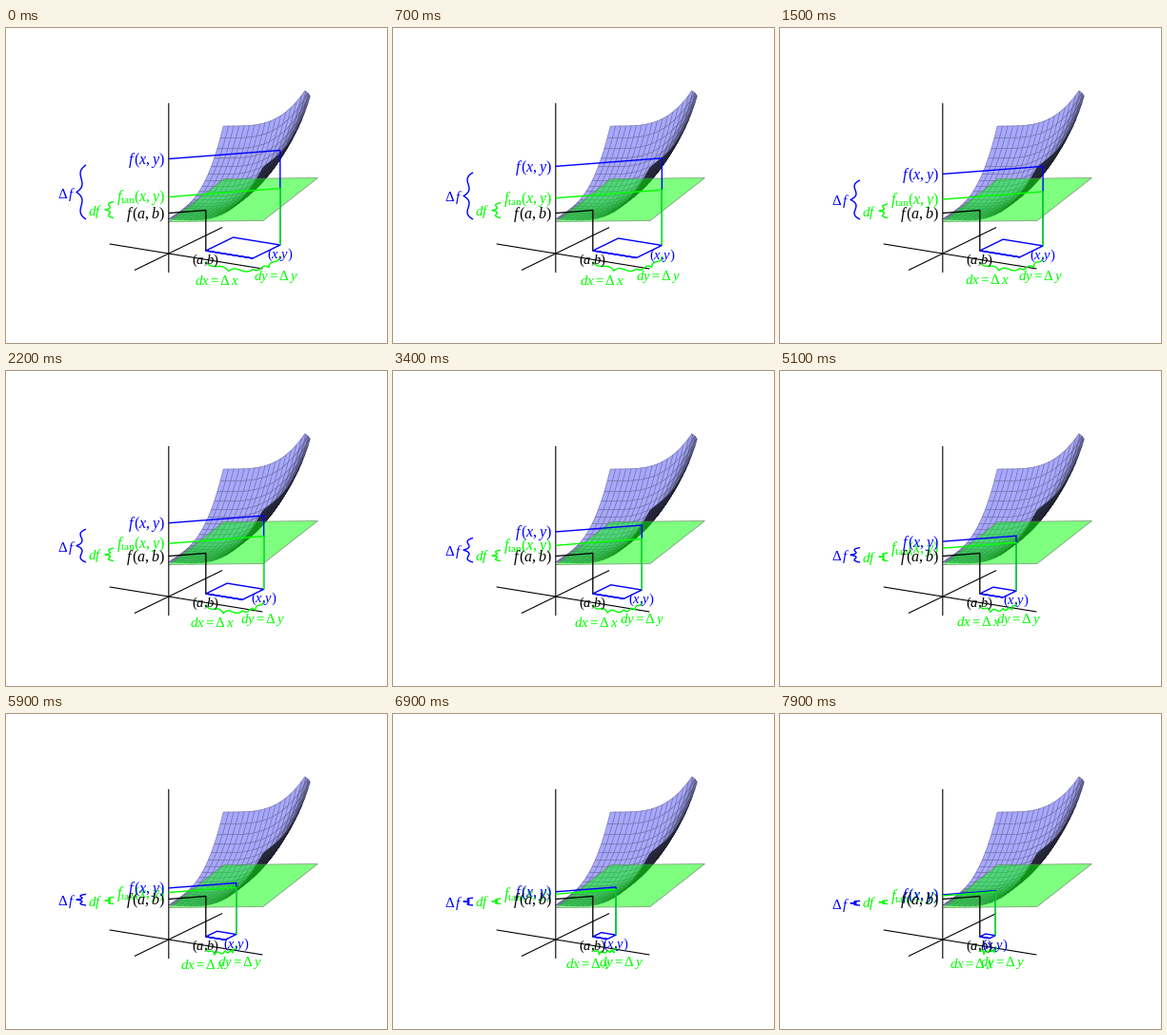
Write a matplotlib script that moves like this. It is 400 by 331 pixels and loops after 8 s.

```python
import numpy as np
import matplotlib.pyplot as plt
from matplotlib.animation import FuncAnimation
from matplotlib.collections import PolyCollection

plt.rcParams.update({
    "mathtext.fontset": "custom",
    "mathtext.rm": "Liberation Serif",
    "mathtext.it": "Liberation Serif:italic",
    "path.snap": False,
})

W, H, DPI = 400, 331, 64
PT = 72 / DPI
FRAMES, INTERVAL = 80, 100
BLUE, GREEN, BLACK = "#0000ff", "#00ff00", "#000000"

ORIGIN = np.array([170.8, 237.0])
UX, UY = np.array([49.3, 8.0]), np.array([28.7, -14.0])
A = 0.5        # both coordinates of the base point
TOP = 157      # clipping height of the surface
MIX = 1.5
CELLS = 18
VIEW = np.array([0.476, -0.832, 0.284])


def project(x, y, z=0.0):
    return ORIGIN + x * UX + y * UY - np.array([0, z])


def g(s):
    return 8.5 * s + (9.5 - MIX / 2) * s**2 + 10.5 * s**3


def slope(s):
    return 8.5 + (19 - MIX) * s + 31.5 * s**2


def height(x, y):
    p, q = x - A, y - A
    return 42.5 + g(p) + g(q) + MIX * p * q


def tangent(x, y):
    return 34 + 8.5 * (x + y)


def shade(x, y):
    p, q = x - A, y - A
    n = np.array([-slope(p) - MIX * q, -slope(q) - MIX * p, 54.4])
    k = np.clip(0.35 + 1.3 * (n @ VIEW) / np.linalg.norm(n), 0.28, 1)
    return k * np.array([0.66, 0.66, 1.0])


def clip_top(pts):
    out = []
    for p, q in zip(pts, pts[1:] + pts[:1]):
        if p[2] <= TOP:
            out.append(p)
        if (p[2] <= TOP) != (q[2] <= TOP):
            out.append(p + (q - p) * (TOP - p[2]) / (q[2] - p[2]))
    return out


def surface():
    faces = []
    d = 2 / CELLS
    for i in range(CELLS):
        for j in range(CELLS):
            corners = [(i, j), (i + 1, j), (i + 1, j + 1), (i, j + 1)]
            pts = clip_top([np.array([d * u, d * v, height(d * u, d * v)])
                            for u, v in corners])
            if len(pts) < 3:
                continue
            x, y = d * (i + 0.5), d * (j + 0.5)
            depth = VIEW @ np.array([x, y, height(x, y) / 54.4])
            faces.append((depth, [project(*p) for p in pts], shade(x, y)))
    faces.sort(key=lambda f: f[0])
    colors = np.array([f[2] for f in faces])
    return PolyCollection([f[1] for f in faces], facecolors=colors,
                          edgecolors=colors * 0.66, linewidths=0.6 * PT, zorder=1)


def brace(p, q, cusp):
    p, q, cusp = (np.asarray(v, float) for v in (p, q, cusp))
    t = np.linspace(0, 1, 25)
    bulge = 4.5 * t * (1 - t)**2 - 1.5 * t**2 * (1 - t) + t**3
    along = np.concatenate([t / 2, 1 - t[::-1] / 2])
    bulge = np.concatenate([bulge, bulge[::-1]])
    return p + np.outer(along, q - p) + np.outer(bulge, cusp)


fig = plt.figure(figsize=(W / DPI, H / DPI), dpi=DPI, facecolor="white")
ax = fig.add_axes([0, 0, 1, 1])
ax.set_xlim(0, W)
ax.set_ylim(H, 0)
ax.axis("off")


def line(color, width, pts=(), z=4):
    artist, = ax.plot([], [], color=color, lw=width * PT, zorder=z,
                      solid_capstyle="butt", solid_joinstyle="round")
    if len(pts):
        move(artist, pts)
    return artist


def move(artist, pts):
    artist.set_data(*np.asarray(pts, float).T)


def label(text, color, size, ha="left", pos=(0, 0)):
    return ax.text(*pos, text, color=color, fontsize=size * PT, ha=ha,
                   va="baseline", zorder=6)


# Fixed scene
ax.add_collection(surface())
plane = [project(x, y, tangent(x, y)) for x, y in [(0, 0), (2, 0), (2, 2), (0, 2)]]
ax.add_collection(PolyCollection([plane], facecolors=[(0, 1, 0, 0.5)],
                                 edgecolors=[(0.4, 0.5, 0.4, 0.75)],
                                 linewidths=0.8 * PT, zorder=2))
line(BLACK, 1.1, [project(-1.26, 0), project(2, 0)], 3)
line(BLACK, 1.1, [project(0, -1.25), project(0, 1.96)], 3)
line(BLACK, 1.1, [(ORIGIN[0], 79), (ORIGIN[0], 257)], 3)

base = project(A, A)
level = ORIGIN[1] - height(A, A)

# Moving parts
square = line(BLUE, 1.4)
f_line = line(BLUE, 1.4)
tan_line = line(GREEN, 1.4)
line(BLACK, 1.3, [(ORIGIN[0], level), project(A, A, height(A, A)), base], 5)

f_brace = line(BLUE, 1.4)
df_brace, dx_brace, dy_brace = (line(GREEN, 1.4) for _ in range(3))

tan_text = label(r"$f_{\mathrm{tan}}(x,y)$", GREEN, 16, "right")
f_text = label(r"$f\,(x,y)$", BLUE, 16, "right")
label(r"$f\,(a,b)$", BLACK, 16, "right", (167, level + 5))
big_text = label(r"$\Delta\,f$", BLUE, 15)
df_text = label(r"$df$", GREEN, 15)
dx_text = label(r"$dx=\Delta\,x$", GREEN, 15)
dy_text = label(r"$dy=\Delta\,y$", GREEN, 15)
label(r"$(a{,}b)$", BLACK, 14.5, "center", (base[0], base[1] + 14))
xy_text = label(r"$(x{,}y)$", BLUE, 14.5, "center")


def update(n):
    s = 1 - n / 100
    c = A + s
    foot, corner = project(c, c), project(c, A)
    f, ft = height(c, c), tangent(c, c)
    f_y, tan_y = ORIGIN[1] - f, ORIGIN[1] - ft

    move(square, [base, corner, foot, project(A, c), base, corner])
    move(f_line, [(ORIGIN[0], f_y), project(c, c, f), foot])
    move(tan_line, [(ORIGIN[0], tan_y), project(c, c, ft), foot])

    move(f_brace, brace((84, f_y + 6.5), (84, level + 6.5), (-10, 0)))
    move(df_brace, brace((113, tan_y + 5), (113, level + 5), (-9, 0)))
    drop = np.array([0, 11.5])
    move(dx_brace, brace(base + drop, corner + drop, (-1, 6)))
    move(dy_brace, brace(corner + drop, foot + drop, (2.5, 5)))

    f_text.set_position((167, f_y + 5.5))
    tan_text.set_position((167, tan_y + 5))
    big_text.set_position((54, (f_y + level) / 2 + 12.5))
    df_text.set_position((86, (tan_y + level) / 2 + 10.5))
    dx_text.set_position((base + corner) / 2 + (-36.5, 32))
    dy_text.set_position((corner + foot) / 2 + (-13.5, 30.5))
    xy_text.set_position(foot + (0, 14))
    return []


anim = FuncAnimation(fig, update, frames=FRAMES, interval=INTERVAL,
                     repeat=True, repeat_delay=0, init_func=lambda: update(0))
plt.show()
```
